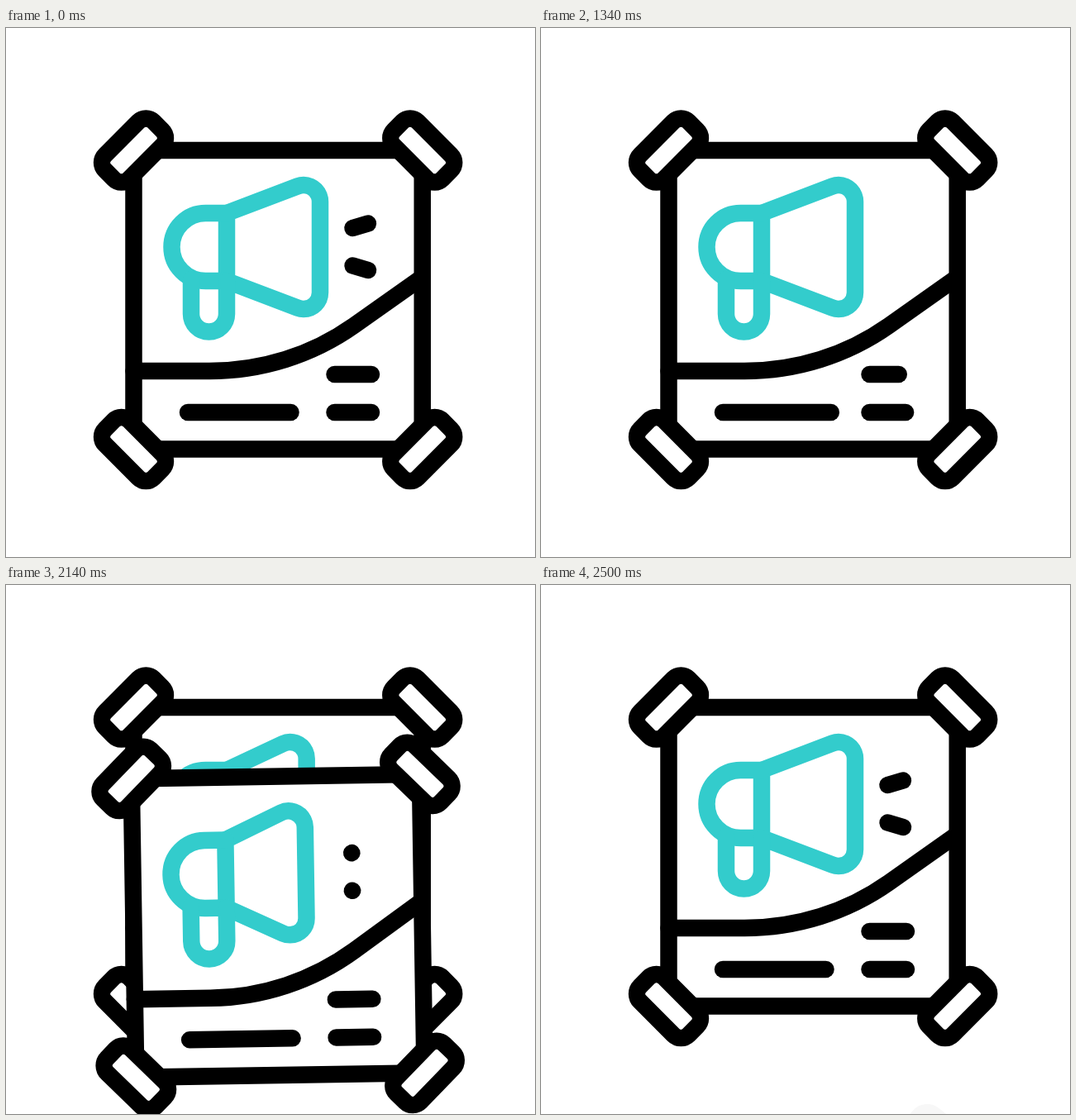
These frames come from a looping animation (640 px wide and 640 px high, 2.62 s). An HTML page with a canvas:

```html
<!DOCTYPE html>
<html lang="en">
<head>
<meta charset="utf-8">
<title>Poster</title>
<style>
  html, body { margin: 0; width: 100%; height: 100%; overflow: hidden; background: #fff; }
  canvas { display: block; width: 640px; height: 640px; }
</style>
</head>
<body>
<canvas id="stage" width="640" height="640"></canvas>
<script>
const ctx = document.getElementById('stage').getContext('2d');
const LOOP = 2620, LAST = 2500, STEP = 20;
const BLACK = '#000', TEAL = '#33cccc', WHITE = '#fff';
const STROKE = 20.5;
const LEFT = 154.5, RIGHT = 503.75, TOP = 148, BOTTOM = 509.5;
const MID_X = (LEFT + RIGHT) / 2, MID_Y = (TOP + BOTTOM) / 2;

// Keys are [time, value] pairs, eased in and out between neighbours.
function track(t, ...keys) {
  if (t <= keys[0][0]) return keys[0][1];
  for (let i = 1; i < keys.length; i++) {
    const [t0, a] = keys[i - 1], [t1, b] = keys[i];
    if (t < t1) {
      const p = (t - t0) / (t1 - t0);
      return a + (b - a) * p * p * (3 - 2 * p);
    }
  }
  return keys[keys.length - 1][1];
}

const fade = (t, from, to) => Math.min(1, Math.max(0, (to - t) / (to - from)));

function line(x0, y0, x1, y1) {
  ctx.beginPath();
  ctx.moveTo(x0, y0);
  ctx.lineTo(x1, y1);
  ctx.stroke();
}

function drawTape(x, y, angle) {
  ctx.save();
  ctx.translate(x, y);
  ctx.rotate(angle);
  ctx.beginPath();
  ctx.roundRect(-41.5, -20.5, 83, 41, 13);
  ctx.fill();
  ctx.stroke();
  ctx.restore();
}

function drawSheet() {
  ctx.strokeStyle = BLACK;
  ctx.fillStyle = WHITE;
  ctx.beginPath();
  ctx.rect(LEFT, TOP, RIGHT - LEFT, BOTTOM - TOP);
  ctx.fill();
  ctx.stroke();

  ctx.beginPath();
  ctx.moveTo(LEFT, 415);
  ctx.lineTo(246, 415);
  ctx.bezierCurveTo(309, 415, 370, 396, 421, 360);
  ctx.lineTo(RIGHT, 301.5);
  ctx.stroke();

  drawTape(LEFT, TOP, -Math.PI / 4);
  drawTape(RIGHT, TOP, Math.PI / 4);
  drawTape(LEFT, BOTTOM, Math.PI / 4);
  drawTape(RIGHT, BOTTOM, -Math.PI / 4);
}

function drawHorn(t) {
  const shift = track(t, [0, 0], [560, -16.5], [1150, 0], [1780, 0], [2130, -16.5], [2300, 0]);
  const x = 267, axis = 265, half = 41, r = 20;
  const cx = 360 + shift, rise = 55;
  const dx = cx - x, dy = half - rise;
  const tangent = Math.atan2(dy, dx) + Math.PI + Math.acos(r / Math.hypot(dx, dy));

  ctx.strokeStyle = TEAL;
  ctx.beginPath();
  ctx.moveTo(x, axis - half);
  ctx.arc(cx, axis - rise, r, tangent, 2 * Math.PI);
  ctx.arc(cx, axis + rise, r, 0, 2 * Math.PI - tangent);
  ctx.lineTo(x, axis + half);
  ctx.closePath();
  ctx.stroke();

  ctx.beginPath();
  ctx.moveTo(x, axis + half);
  ctx.lineTo(241.5, axis + half);
  ctx.arc(241.5, axis, half, Math.PI / 2, Math.PI * 1.5);
  ctx.lineTo(x, axis - half);
  ctx.stroke();

  ctx.beginPath();
  ctx.moveTo(x, axis + half);
  ctx.lineTo(x, 346);
  ctx.arc(245.5, 346, 21.5, 0, Math.PI);
  ctx.lineTo(224, 304);
  ctx.stroke();
}

function drawSound(t, alpha) {
  const leaving = t < 1000;
  if (leaving ? t >= 500 : t < 2120) return;
  const start = leaving ? track(t, [130, 0], [540, 1]) : 0;
  const end = leaving ? 1 : track(t, [2120, 0], [2385, 1]);
  const x = p => 419.5 + 18.5 * p;
  ctx.globalAlpha = alpha * (leaving ? fade(t, 300, 500) : 1);
  ctx.strokeStyle = BLACK;
  line(x(start), 242 - 5.5 * start, x(end), 242 - 5.5 * end);
  line(x(start), 287.5 + 5.5 * start, x(end), 287.5 + 5.5 * end);
  ctx.globalAlpha = alpha;
}

function drawBars(t) {
  const long = track(t, [0, 0], [680, -31], [1490, 10], [1790, 0]);
  const lower = track(t, [310, 0], [940, -19.5], [1620, 10], [1900, 0]);
  const upper = track(t, [440, 0], [1070, -19.5], [1750, 10], [2030, 0]);
  ctx.strokeStyle = BLACK;
  line(220, 465, 344.5 + long, 465);
  line(397.5, 465, 442 + lower, 465);
  line(397.5, 419, 442 + upper, 419);
}

function drawPoster(t, alpha = 1) {
  ctx.globalAlpha = alpha;
  drawSheet();
  drawHorn(t);
  drawSound(t, alpha);
  drawBars(t);
  ctx.globalAlpha = 1;
}

function drawFallingPoster(t) {
  const fall = track(t, [2005, 0], [2560, 1]);
  if (fall === 0) return;
  ctx.save();
  ctx.translate(MID_X, MID_Y + 562 * fall);
  ctx.rotate(-6 * fall * Math.PI / 180);
  ctx.translate(-MID_X, -MID_Y);
  drawPoster(t, fade(t, 2380, 2504));
  ctx.restore();
}

function render(now) {
  const t = Math.min(LAST, Math.floor((now % LOOP) / STEP) * STEP);
  ctx.fillStyle = WHITE;
  ctx.fillRect(0, 0, 640, 640);
  ctx.lineWidth = STROKE;
  ctx.lineCap = ctx.lineJoin = 'round';
  drawPoster(t);
  drawFallingPoster(t);
}

const startTime = performance.now();
function tick() {
  render(performance.now() - startTime);
  requestAnimationFrame(tick);
}
tick();
</script>
</body>
</html>
```
